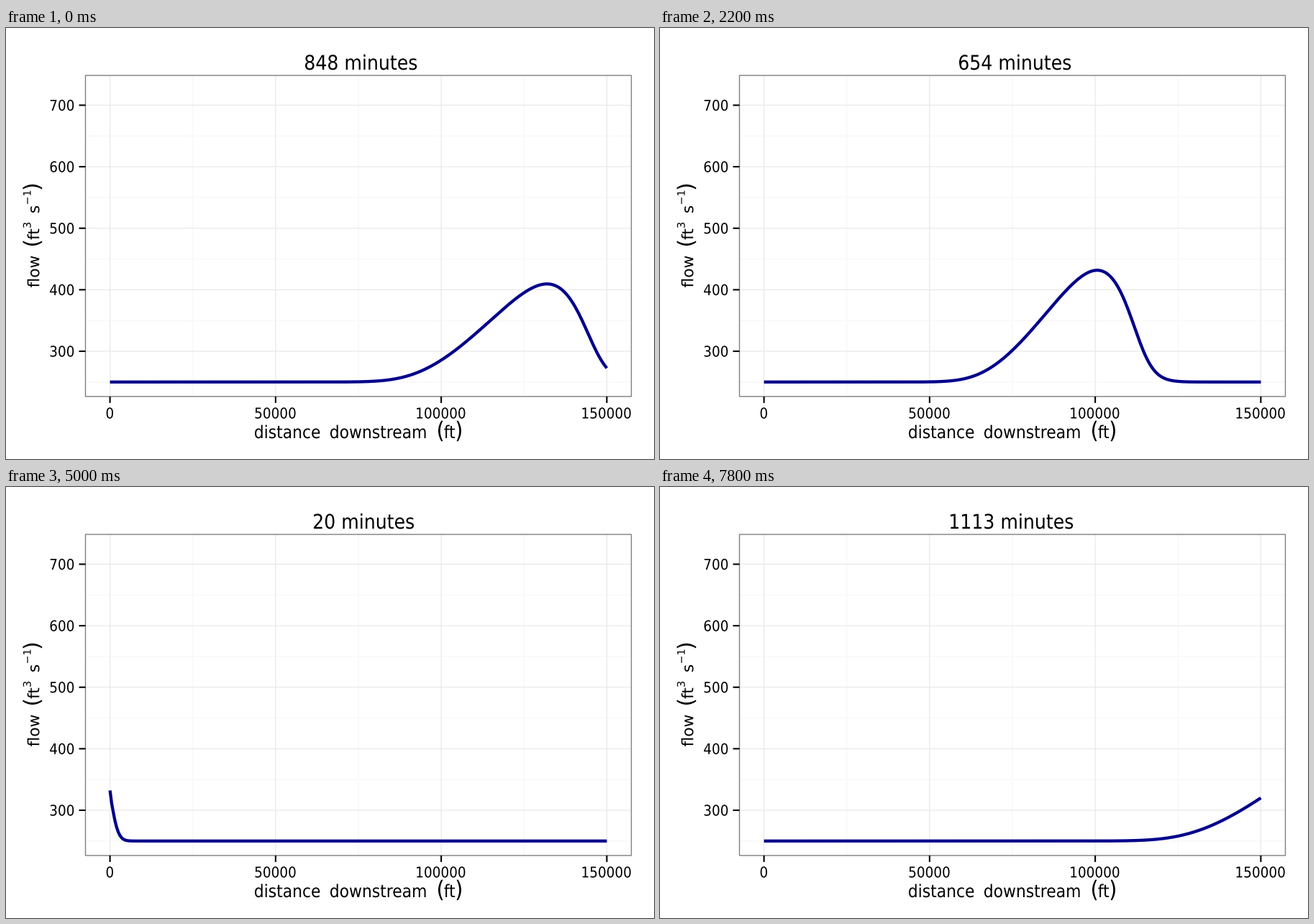
These frames come from a looping animation (901 by 600 pixels, 8000 ms). A matplotlib script:

```python
import math

import numpy as np
import matplotlib.pyplot as plt
from matplotlib.animation import FuncAnimation
from matplotlib.patches import PathPatch, Rectangle
from matplotlib.textpath import TextPath
from matplotlib.transforms import Affine2D

W, H, DPI = 901, 600, 100
PX = 72 / DPI                      # points per pixel

# Channel (feet, seconds)
WIDTH, SLOPE, ROUGH, CM, G = 100.0, 0.001, 0.045, 1.486, 32.2
BASE = 250.0
DX, NODES, SHOWN = 500.0, 441, 301
SAVE, SUB = 612.8, 40              # seconds between snapshots, substeps in each
DT = SAVE / SUB

# Snapshots in the shuffled order in which they play
ORDER = [83, 27, 96, 58, 9, 112, 45, 74, 13, 102,
         36, 64, 20, 91, 70, 5, 116, 48, 79, 17,
         41, 105, 61, 30, 88, 2, 54, 99, 23, 32,
         76, 110, 67, 94, 57, 51, 85, 7, 38, 109]


def inflow(t):
    if t >= 9000:
        return BASE
    return BASE + 750 / math.pi * (1 - math.cos(math.pi * t / 4500))


def normal_area(q):
    area = 170.0
    for _ in range(60):
        perimeter = WIDTH + 2 * area / WIDTH
        area = (q * ROUGH * perimeter ** (2 / 3) / (CM * SLOPE ** 0.5)) ** 0.6
    return area


def flux(u):
    a, q = u
    return np.array([q, q * q / a + G * a * a / (2 * WIDTH)])


def source(u):
    a, q = u
    radius = a / (WIDTH + 2 * a / WIDTH)
    friction = (ROUGH * q / (CM * a)) ** 2 / radius ** (4 / 3)
    return np.array([np.zeros_like(a), G * a * (SLOPE - friction)])


def advance(u, t):
    """One MacCormack step of the shallow water equations."""
    k = DT / DX
    p = u.copy()
    p[:, :-1] += DT * source(u)[:, :-1] - k * np.diff(flux(u), axis=1)
    p[:, -1] = p[:, -2]
    p[1, 0] = inflow(t + DT)
    new = p.copy()
    new[:, 1:] = 0.5 * (u[:, 1:] + p[:, 1:] + DT * source(p)[:, 1:]
                        - k * np.diff(flux(p), axis=1))
    new[:, -1] = new[:, -2]
    return new


def route(count):
    u = np.array([np.full(NODES, normal_area(BASE)), np.full(NODES, BASE)])
    flows = [u[1, :SHOWN].copy()]
    for n in range(count * SUB):
        u = advance(u, n * DT)
        if (n + 1) % SUB == 0:
            flows.append(u[1, :SHOWN].copy())
    return flows


flows = route(max(ORDER))

# Stage with pixel coordinates, y downwards
fig = plt.figure(figsize=(W / DPI, H / DPI), dpi=DPI, facecolor="white")
ax = fig.add_axes([0, 0, 1, 1])
ax.set_xlim(0, W)
ax.set_ylim(H, 0)
ax.axis("off")

LEFT, RIGHT, TOP, BOTTOM = 110.5, 869.5, 66.0, 513.0


def px(feet):
    return 144.6 + feet * 690.8 / 150000


def py(flow):
    return 450.0 - (flow - 300) * 0.8563


def line(xs, ys, color, width, z):
    return ax.plot(xs, ys, color=color, lw=width * PX, zorder=z, snap=False,
                   solid_capstyle="butt", solid_joinstyle="round")[0]


def glyphs(text, x, y, size, anchor=0.0, turn=0):
    """Outline of text, anchored on its ink, y at the baseline.

    Level text is set in a condensed face, turned text in the normal one.
    """
    path = TextPath((0, 0), text, size=size, prop={"family": "DejaVu Sans"})
    box = path.get_extents()
    start = box.x0 + anchor * box.width
    move = Affine2D().translate(-start, 0).scale(1 if turn else 0.9, -1)
    return move.rotate_deg(turn).translate(x, y).transform_path(path)


def write(*args, **kw):
    patch = PathPatch(glyphs(*args, **kw), fc="black", lw=0, zorder=6)
    ax.add_patch(patch)
    return patch


# Grid
for feet in (25000, 75000, 125000):
    line([px(feet)] * 2, [TOP, BOTTOM], "#fafafa", 2.1, 1)
for flow in range(250, 700, 100):
    line([LEFT, RIGHT], [py(flow)] * 2, "#fafafa", 2.1, 1)

# Major lines, ticks and tick labels
for feet in range(0, 150001, 50000):
    x = px(feet)
    line([x, x], [TOP, BOTTOM], "#e5e5e5", 1, 2)
    line([x, x], [BOTTOM, BOTTOM + 9], "black", 2.1, 5)
    write(str(feet), x - 0.3, 543.5, 20.5, anchor=0.5)
for flow in range(300, 701, 100):
    y = py(flow)
    line([LEFT, RIGHT], [y, y], "#e5e5e5", 1, 2)
    line([LEFT - 9, LEFT], [y, y], "black", 2.1, 5)
    write(str(flow), 94.2, y + 7.5, 20.5, anchor=1)

ax.add_patch(Rectangle((LEFT, TOP), RIGHT - LEFT, BOTTOM - TOP, fill=False,
                       ec="#7f7f7f", lw=1.4 * PX, zorder=4, snap=False))

# Axis titles
for text, x, size in (("distance", 346, 24.3), ("downstream", 451, 24.3),
                      ("(", 601, 32), ("ft", 609.3, 24.3), (")", 626.5, 32)):
    write(text, x, 571, size)
for text, x, y, size in (("\ufb02ow", 46.2, 361, 21.8), ("(", 46.2, 303, 30),
                         ("ft", 46.2, 294.5, 21.8), ("3", 34.5, 278, 14.6),
                         ("s", 46.2, 257, 21.8), ("\u22121", 34.5, 245, 14.4),
                         (")", 46.2, 224.5, 30)):
    write(text, x, y, size, turn=-90)

reach = px(np.arange(SHOWN) * DX)
curve = line(reach, py(flows[0]), "#00008b", 4.3, 3)


def heading(step):
    minutes = str(round(step * SAVE / 60))
    return glyphs(minutes + " minutes", 452 - 12 * len(minutes), 58, 28)


title = PathPatch(heading(ORDER[0]), fc="black", lw=0, zorder=6)
ax.add_patch(title)


def update(i):
    step = ORDER[i]
    curve.set_ydata(py(flows[step]))
    title.set_path(heading(step))
    return curve, title


anim = FuncAnimation(fig, update, frames=len(ORDER), interval=200,
                     init_func=lambda: update(0), repeat=True, repeat_delay=0)
plt.show()
```
